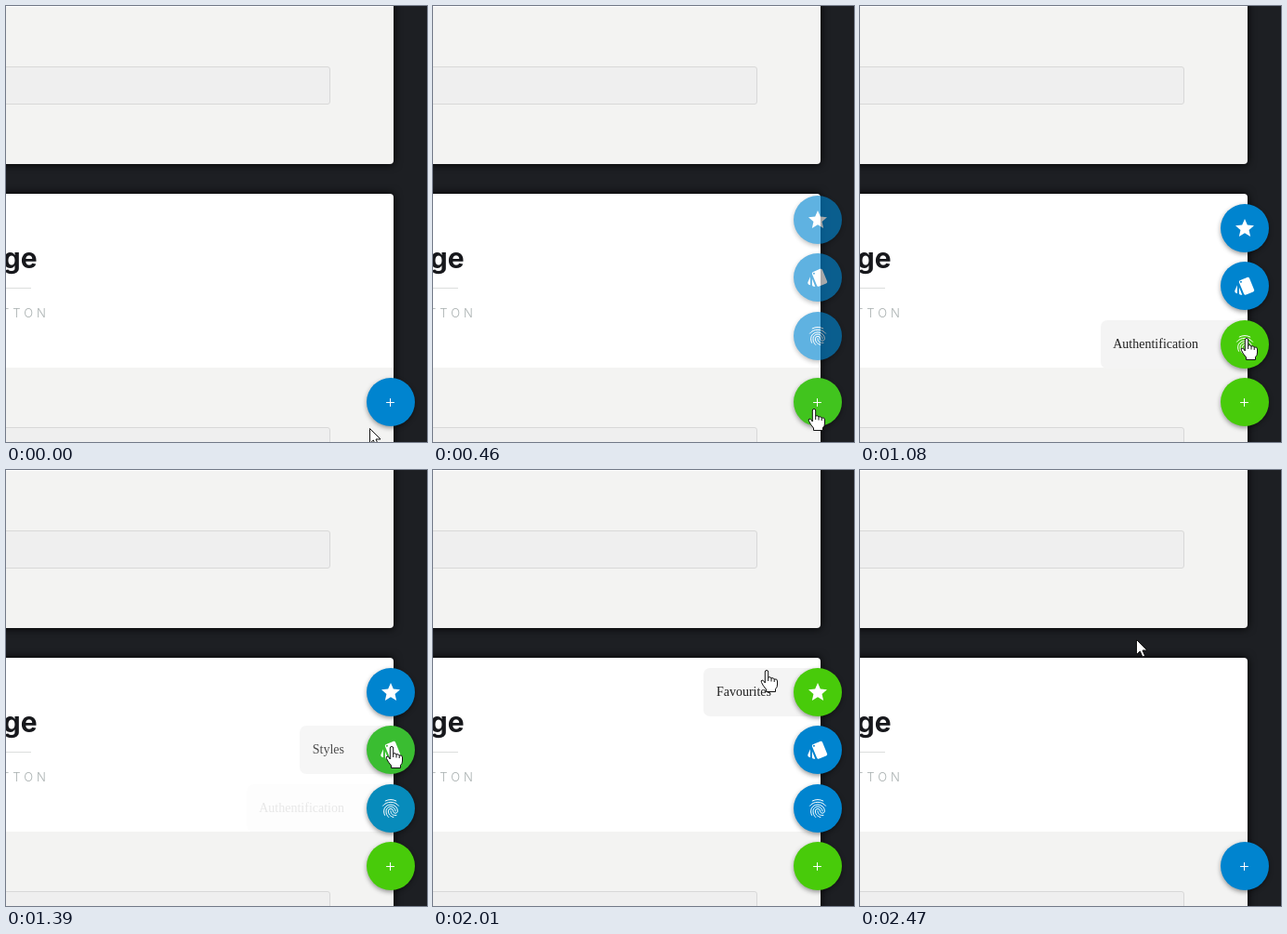
An HTML page that plays this animation: 453x469 px, repeating every 2620 ms.

```html
<!DOCTYPE html>
<html lang="en">
<head>
<meta charset="utf-8">
<title>Floating action menu</title>
<style>
  html, body { margin: 0; height: 100%; overflow: hidden; background: #1d1f23; }
  svg { display: block; }
  .card { filter: drop-shadow(0 0 5px #000); }
  .fab { filter: drop-shadow(0 2px 2.5px rgba(0, 0, 0, .4)); }
  .field { fill: #efefef; stroke: #d8d8d8; }
  .title { font: 700 30px Inter, sans-serif; fill: #17181c; }
  .sub { font: 300 13px Inter, sans-serif; letter-spacing: 4px; fill: #a9b0b0; }
  .tip text { font: 14px "Liberation Serif", serif; fill: #222; }
  .line { fill: none; stroke: #fff; stroke-linecap: round; }
</style>
</head>
<body>
<svg width="453" height="469" viewBox="0 0 453 469">
  <rect class="card" x="-20" y="-20" width="437" height="190" rx="4" fill="#f3f3f2"/>
  <path d="M0 .5H417" stroke="#fff"/>
  <rect class="field" x="-9.5" y="65.5" width="358" height="40" rx="2.5"/>

  <rect class="card" x="-20" y="202" width="437" height="290" rx="4" fill="#fff"/>
  <path d="M0 389H417V469H0z" fill="#f3f3f2"/>
  <rect class="field" x="-9.5" y="453.5" width="358" height="40" rx="2.5"/>
  <text class="title" x="33.5" y="282" text-anchor="end">ge</text>
  <path d="M0 303.5H27" stroke="#dcdedd"/>
  <text class="sub" x="47" y="335" text-anchor="end">TTON</text>

  <g id="menu"></g>
  <g class="fab">
    <circle id="main" cx="414" cy="426" r="26"/>
    <path class="line" d="M409.5 426.5h8M413.5 422.5v8"/>
  </g>

  <path id="arrow" d="M.5 .5V16.5L4.3 13 7 19 9.6 17.9 7 12H12z" fill="#fff" stroke="#111"/>
  <path id="hand" fill="#fff" stroke="#111" stroke-linejoin="round"
    d="M-1.7 14V2Q-1.7 .5 0 .5T1.7 2V8Q4.6 7 5 9 7.6 8 8.2 10 11.5 9.3 11.5 12V16Q11.5 19 9.5 20.5V23.5H-.5V21Q-4 17-5.5 13.5-6.5 11.5-5 11-3.6 10.8-1.7 14zM1.7 8v4M5 9v3.5M8.2 10v3"/>
</svg>
<script>
const LOOP = 2620, START = 130, STEP = 78;
const OPEN = 315, CLOSE = 2040;
const BLUE = [0, 132, 207], GREEN = [72, 203, 10];

// Pointer waypoints, joined by straight moves
const PATH = [
  { t: START, x: 391, y: 454 },
  { t: 452, x: 410, y: 433 },
  { t: 690, x: 415, y: 403 },
  { t: 1240, x: 417, y: 338 },
  { t: 1390, x: 415, y: 296 },
  { t: 1780, x: 421, y: 246 },
  { t: 2160, x: 320, y: 195 },
  { t: 2470, x: 297, y: 182 }
];

const starPoints = Array.from({ length: 10 }, (_, i) => {
  const r = i % 2 ? 4.8 : 10.5, angle = i * Math.PI / 5;
  return [12 + r * Math.sin(angle), 12.5 - r * Math.cos(angle)];
});

const ITEMS = [
  { label: "Favourites", from: 1702, to: CLOSE, icon: `<polygon fill="#fff" points="${starPoints}"/>` },
  { label: "Styles", from: 1268, to: 1555,
    icon: `<path fill="#fff" fill-rule="evenodd" d="M2.5 19.7l1.4.5v-9L1.4 17c-.4 1 .1 2.2 1.1 2.7z
      M22 16 17.1 4c-.4-1-1.6-1.5-2.6-1.1L7.1 6C6 6.4 5.6 7.5 6 8.6l5 11.9c.4 1 1.6 1.5 2.6 1.1l7.4-3.1c1-.4 1.5-1.5 1-2.5z
      M7.9 8.8a1 1 0 1 1 0-2 1 1 0 0 1 0 2zM5.9 19.8c0 1.1.9 2 2 2h1.4l-3.4-8.4z"/>` },
  { label: "Authentification", from: 810, to: 1240,
    icon: `<path class="line" d="M6.2 4Q12 1 17.8 4M3.5 9.2C7.3 3.9 16.7 3.9 20.5 9.2
      M9.7 21.5C7.9 19.7 7 18 7 14.9a5 4.8 0 0 1 10 0
      M14.9 21.5c-3.6-1-5.5-3.3-5.5-6.6a2.6 2.5 0 0 1 5.2 0c0 3 4.8 3 4.8 0a7.4 7 0 0 0-14.8 0c0 1.6.3 3 .9 4.4
      M12 14.7c0 3.3 2 5.2 6 4.7"/>` }
];

const $ = id => document.getElementById(id);
const menu = $("menu"), main = $("main"), arrow = $("arrow"), hand = $("hand");

menu.innerHTML = ITEMS.map(({ label, icon }, i) => `
  <g transform="translate(414 ${Math.floor(239 + 62.5 * i)})">
    <g class="tip">
      <rect y="-26" height="52" rx="7" fill="#f4f4f4"/>
      <text x="-50" y="4" text-anchor="end">${label}</text>
    </g>
    <g class="fab">
      <circle r="26"/>
      <g transform="translate(-12 -12)">${icon}</g>
    </g>
  </g>`).join("");
const tips = menu.querySelectorAll(".tip");
const discs = menu.querySelectorAll("circle");

// Each label box is as wide as its text, and ends behind the button
for (const tip of tips) {
  const [box, text] = tip.children;
  const width = Math.round(text.getComputedTextLength() + 63.5);
  box.setAttribute("x", -width);
  box.setAttribute("width", width);
}

// CSS "ease": cubic-bezier(.25, .1, .25, 1)
function ease(x) {
  if (x <= 0) return 0;
  if (x >= 1) return 1;
  const bezier = (a, b, s) => 3 * a * s * (1 - s) ** 2 + 3 * b * s * s * (1 - s) + s ** 3;
  let lo = 0, hi = 1;
  for (let i = 0; i < 20; i++) {
    const mid = (lo + hi) / 2;
    if (bezier(.25, .25, mid) < x) lo = mid; else hi = mid;
  }
  return bezier(.1, 1, lo);
}

const toggle = (t, from, to, duration) => ease((t - from) / duration) - ease((t - to) / duration);
const mix = (a, b, k) => Math.round(a + (b - a) * k);
const tint = k => `rgb(${BLUE.map((c, i) => mix(c, GREEN[i], k))})`;

function pointer(t) {
  const next = Math.max(1, PATH.findIndex(p => p.t >= t));
  const a = PATH[next - 1], b = PATH[next];
  const k = Math.max(0, (t - a.t) / (b.t - a.t));
  return [mix(a.x, b.x, k), mix(a.y, b.y, k)];
}

function draw(t) {
  const shown = toggle(t, OPEN, CLOSE, 380);
  menu.setAttribute("opacity", shown);
  menu.setAttribute("transform", `translate(0 ${-24 * (1 - shown)})`);
  main.setAttribute("fill", tint(toggle(t, OPEN, CLOSE, 220)));
  ITEMS.forEach(({ from, to }, i) => {
    const hover = toggle(t, from, to, 240);
    tips[i].setAttribute("opacity", hover);
    discs[i].setAttribute("fill", tint(hover));
  });

  const overMenu = t >= OPEN && t < CLOSE;
  arrow.style.display = overMenu ? "none" : "";
  hand.style.display = overMenu ? "" : "none";
  (overMenu ? hand : arrow).setAttribute("transform", `translate(${pointer(t)})`);
}

// The picture is held for one step at a time
function tick() {
  const now = performance.now() % LOOP;
  const held = START + 10 + STEP * Math.floor((now - START) / STEP);
  draw(now < START ? 0 : Math.min(held, PATH.at(-1).t));
  requestAnimationFrame(tick);
}
tick();
</script>
</body>
</html>
```
